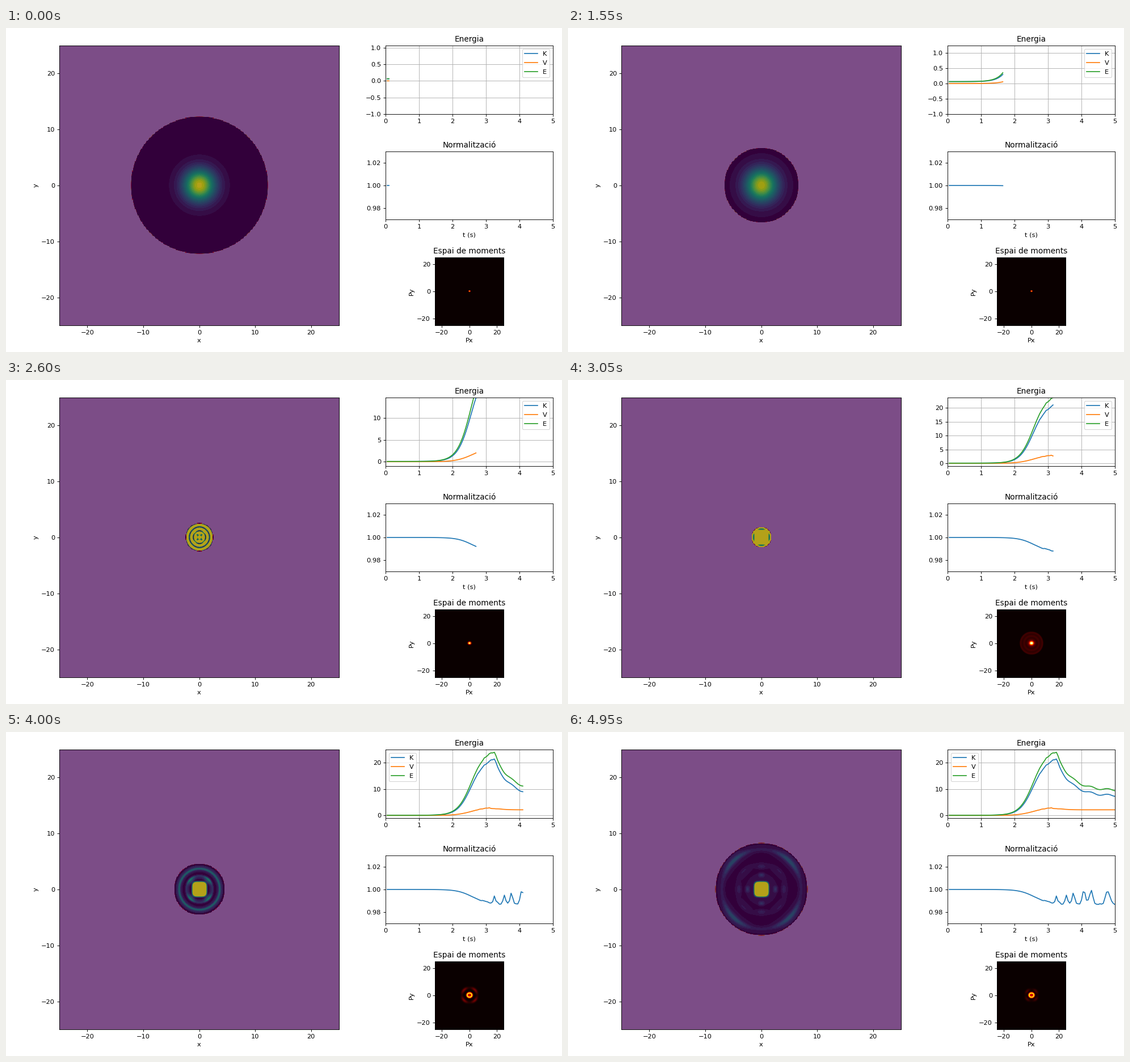
Write a matplotlib script that moves like this. It is 980 px wide and 572 px high and loops after 5 s.

```python
import numpy as np
import matplotlib.pyplot as plt
from matplotlib.animation import FuncAnimation

W, H, DPI, FRAMES, STEP = 980, 572, 81.6, 100, 0.05
VIRIDIS = plt.get_cmap("viridis")(np.linspace(0, 1, 21))[:, :3]
HOT = plt.get_cmap("hot")(np.linspace(0, 1, 64))[:, :3]


def clock(n):
    return STEP * (n + 2)


def bump(x, centre, width):
    return np.exp(-((x - centre) / width)**2)


def rise(x, centre, width):
    return 1 / (1 + np.exp((centre - x) / width))


def ramp(x, start, end):
    return np.clip((x - start) / (end - start), 0, 1)


def wall(t):
    """Radius of the circular box: it closes, rests, then opens again."""
    if t < 3.14:
        radius = 12.5 - 3.35 * t - 0.14 * t**2
    else:
        radius = 4.5 + 3.85 * (t - 4.1)
    return max(1.75, radius)


# ---- energies and norm -------------------------------------------------
times = STEP * np.arange(1, FRAMES + 2)
jitter = np.random.default_rng(4).uniform(-1, 1, (3, times.size))

growth = 0.0625 + 24.8 * rise(times, 2.56, 0.205)
decay = 9.5 + 14.3 * np.exp(-(times - 3.25) / 0.42)
decay += 0.35 * np.cos(2 * np.pi * (times - 4.28) / 0.5)
total = np.where(times < 3.22, growth, decay)
total += 0.3 * jitter[0] * bump(times, 3.1, 0.3)

potential = rise(times, 2.45, 0.22) * (2.15 + 0.75 * bump(times, 3, 0.45))
potential += 0.25 * jitter[1] * bump(times, 3.1, 0.25)
kinetic = total - potential

loss = 125 * rise(times, 2.58, 0.22) + 10 * jitter[2] * ramp(times, 2.6, 3.3)
for peak in (3.25, 3.55, 3.76, 4.07, 4.29, 4.78):
    late = peak - 3.25
    loss -= (60 + 60 * min(late, 1)) * bump(times, peak, 0.045 + 0.025 * late)
norm = 1 - 1e-4 * np.maximum(loss, 0)


# ---- wave packet squeezed by the wall (one quadrant, even symmetry) ----
DX, CELLS, DT, HEIGHT = 0.125, 100, 0.005, 200
BLEND = (2.85, 3.15)

node = DX * (np.arange(CELLS) + 0.5)
node_r = np.hypot(node[:, None], node)


def propagator():
    h = np.eye(CELLS) / DX**2
    h -= (np.eye(CELLS, k=1) + np.eye(CELLS, k=-1)) / (2 * DX**2)
    h[0, 0] -= 1 / (2 * DX**2)
    energy, modes = np.linalg.eigh(h)
    return (modes * np.exp(-1j * energy * DT)) @ modes.T


def squeeze():
    """Relative density in one quadrant for every frame up to the blend's end."""
    u = propagator()
    psi = np.exp(-node_r**2 / 16).astype(complex)
    states, t = [np.abs(psi)**2], clock(0)
    while clock(len(states)) < BLEND[1] + 0.01:
        for _ in range(round(STEP / DT)):
            t += DT
            v = HEIGHT * np.clip((node_r - wall(t)) / DX + 0.5, 0, 1)
            psi = np.exp(-1j * v * DT) * (u @ psi @ u.T)
        states.append(np.abs(psi)**2)
    return states


states = squeeze()

# Screen grid of one quadrant and linear resampling onto it.
HALF = 247
pos = (np.arange(HALF) + 0.5) * 25 / HALF
X, Y = np.meshgrid(pos, pos)
R = np.hypot(X, Y)
DIAG = (2 * X * Y / R**2)**2
resample = np.array([np.interp(pos, node, row, right=0)
                     for row in np.eye(CELLS)]).T
snap = DX * (np.floor(pos / DX) + 0.5)
SNAP_R = np.hypot(snap[:, None], snap)


def burst(t):
    """Core left behind plus rings flying outward after the squeeze."""
    age = max(t - 3.1, 0.2)
    s = R / age
    g = 0.75 * ramp(age, 1, 2)
    core = 2 * np.exp(-((X**4 + Y**4)**0.25 / 1.27)**8)
    rim = 1.2 * bump(R, wall(t) - 0.1, 0.2) * bump(t, 3.1, 0.25)
    outer = 0.46 / age**0.5 * bump(s, 3.65, 0.4) * (1 - g + g * DIAG**1.5)
    middle = 0.75 / age**3 * bump(s, 2.2, 0.32) * (0.35 + 0.65 * DIAG**2)
    ripple = 0.78 + 0.22 * np.cos(2 * np.pi * R / (0.6 * age))
    spots = (bump(R, 2.5, 0.4) + 0.8 * bump(R, 4, 0.4)) * (1 - DIAG)**6
    haze = 0.07 * rise(-R, -2.8, 0.1)
    edge = ramp(wall(t) - R, 0, 0.3)
    rings = (outer + middle) * ripple + g * (0.2 * spots + haze)
    return rim + edge * (core + rings)


def mirror(q):
    top = np.concatenate([q[:, ::-1], q], axis=1)
    return np.concatenate([top[::-1], top])


def scene(n):
    t = clock(n)
    mix = ramp(t, *BLEND)
    density = np.zeros_like(R)
    if n < len(states):
        density += (1 - mix) * (resample @ states[n] @ resample.T)
    if mix > 0:
        density += mix * burst(t)
    density[SNAP_R > wall(t)] = 0
    level = np.rint(20 * np.clip(density, 0, 1)).astype(int)
    shade = np.rint(63 * ramp(SNAP_R - wall(t), 0, 0.06)).astype(int)
    return mirror(0.7 * VIRIDIS[level] + 0.3 * HOT[shade])


# ---- momentum space ----------------------------------------------------
k = np.linspace(-25, 25, 121)
KX, KY = np.meshgrid(k, k)
K = np.hypot(KX, KY)
K_DIAG = (2 * KX * KY / np.maximum(K, 0.1)**2)**2


def momenta(n):
    t = clock(n)
    late = ramp(t, 3.25, 3.7)
    dot = (0.7 + 0.3 * ramp(t, 1.7, 3.1)) * bump(
        K, 0, 0.45 + 0.85 * ramp(t, 1.7, 3.15)**2)
    ring = 0.75 * bump(K, 1.5, 0.65) + 0.28 * bump(K, 0, 0.8)
    radius = 8.5 - 3.1 * ramp(t, 3.1, 4.7)
    disc = 0.07 * ramp(t, 2.7, 3) * rise(-K, -radius, 0.15)
    disc *= 1 + 0.2 * np.cos(2 * np.pi * K / 2.6)
    arcs = (0.08 + 0.08 * bump(t, 4.1, 0.6)) * bump(K, radius - 1.2, 1)
    arcs *= 0.25 + 0.75 * K_DIAG
    return (1 - late) * (dot + disc) + late * (ring + arcs)


# ---- figure ------------------------------------------------------------
# The small surplus guards against rounding down to one pixel less.
fig = plt.figure(figsize=((W + 0.01) / DPI, (H + 0.01) / DPI), dpi=DPI,
                 facecolor="white")


def panel(left, top, width, height, **props):
    ax = fig.add_axes([left / W, 1 - (top + height) / H, width / W, height / H])
    ax.set(**props)
    return ax


def picture(ax, data, **kw):
    return ax.imshow(data, extent=(-25, 25, -25, 25), origin="lower",
                     aspect="auto", interpolation="nearest", **kw)


main = panel(94, 31, 493, 494, xlabel="x", ylabel="y")
main_img = picture(main, scene(0))
main.set(xticks=range(-20, 21, 10), yticks=range(-20, 21, 10))

energy_ax = panel(669, 31, 295, 121, title="Energia", xlim=(0, 5))
energy_ax.grid(True)
series = (kinetic, potential, total)
energy_lines = [energy_ax.plot([], [], label=s)[0] for s in "KVE"]

norm_ax = panel(669, 218, 295, 120, title="Normalització",
                xlabel="t (s)", xlim=(0, 5), ylim=(0.97, 1.03),
                yticks=[0.98, 1.0, 1.02])
norm_line, = norm_ax.plot([], [])

mom_ax = panel(756, 405, 121, 120, title="Espai de moments",
               xlabel="Px", ylabel="Py")
mom_img = picture(mom_ax, momenta(0), cmap="hot", vmin=0, vmax=1)
mom_ax.set(xticks=[-20, 0, 20], yticks=[-20, 0, 20])


def update(n):
    shown = slice(0, n + 2)
    main_img.set_data(scene(n))
    mom_img.set_data(momenta(n))
    for line, values in zip(energy_lines, series):
        line.set_data(times[shown], values[shown])
    norm_line.set_data(times[shown], norm[shown])
    energy_ax.set_ylim(-1, 1 + total[:max(n, 1)].max())
    side = "upper left" if clock(n) > 4.07 else "upper right"
    energy_ax.legend(loc=side)
    return [main_img, mom_img, norm_line, *energy_lines]


anim = FuncAnimation(fig, update, frames=FRAMES, interval=50,
                     repeat=True, repeat_delay=0, blit=False)
plt.show()
```
